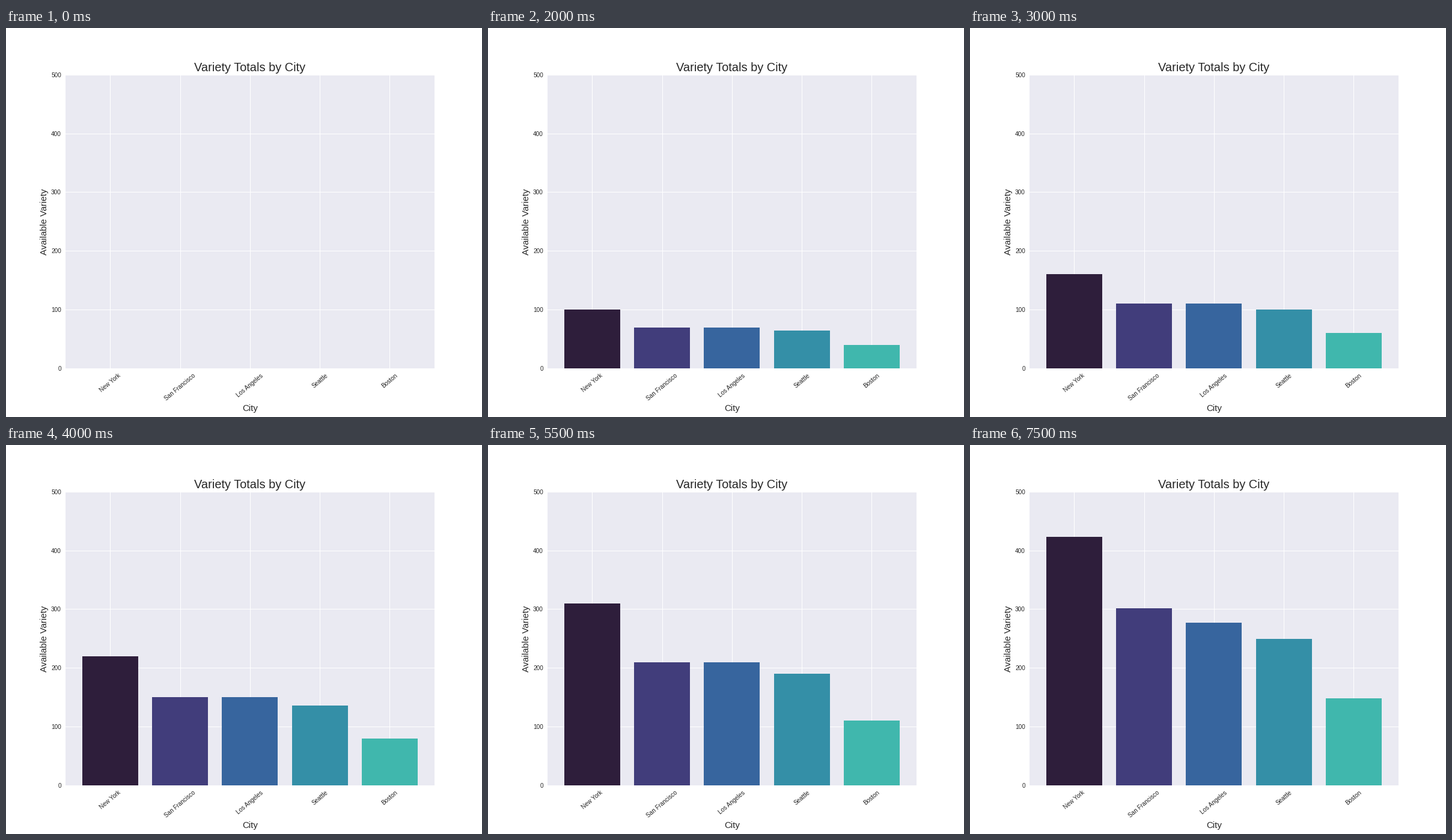
These frames come from a looping animation (792 by 648 pixels, 8000 ms). A matplotlib script:

```python
import numpy as np
import matplotlib.pyplot as plt
from matplotlib.animation import FuncAnimation

INK = "0.15"
CITIES = ["New York", "San Francisco", "Los Angeles", "Seattle", "Boston"]
COLORS = ["#2e1e3b", "#413d7b", "#37659e", "#348fa7", "#40b7ad"]
TOTALS = np.array([423, 301, 277, 249, 148])
FIRST = 10
STEPS = np.array([30, 20, 20, 18, 10])
FRAMES = 16

plt.rcParams.update({
    "font.family": "Liberation Sans",
    "text.color": INK,
    "axes.labelcolor": INK,
    "axes.facecolor": "#eaeaf2",
    "axes.linewidth": 0,
    "axes.axisbelow": True,
    "axes.grid": True,
    "grid.color": "white",
    "grid.linestyle": "-",
    "grid.linewidth": 1,
})

fig = plt.figure(figsize=(11, 9), dpi=72, facecolor="white")
ax = fig.add_axes([0.125, 0.125, 0.775, 0.755])
bars = ax.bar(range(len(CITIES)), np.zeros(len(CITIES)), width=0.8,
              color=COLORS, linewidth=0)

ax.set_xlim(-0.64, 4.64)
ax.set_ylim(0, 500)
ax.set_xticks(range(len(CITIES)), CITIES, rotation=40)
ax.set_yticks(range(0, 501, 100))
ax.tick_params(length=0, pad=7, labelsize=10, labelcolor=INK)
ax.set_title("Variety Totals by City", fontsize=20)
ax.set_xlabel("City", fontsize=15)
ax.set_ylabel("Available Variety", fontsize=15)


def heights(frame):
    """Bars grow by a constant step, then jump to the exact totals."""
    if frame == 0:
        return np.zeros(len(CITIES))
    if frame == FRAMES - 1:
        return TOTALS
    return FIRST + STEPS * (frame - 1)


def update(frame):
    for bar, height in zip(bars, heights(frame)):
        bar.set_height(height)
    return list(bars)


anim = FuncAnimation(fig, update, frames=FRAMES, interval=500,
                     init_func=lambda: update(0), repeat=True, repeat_delay=0)
plt.show()
```
